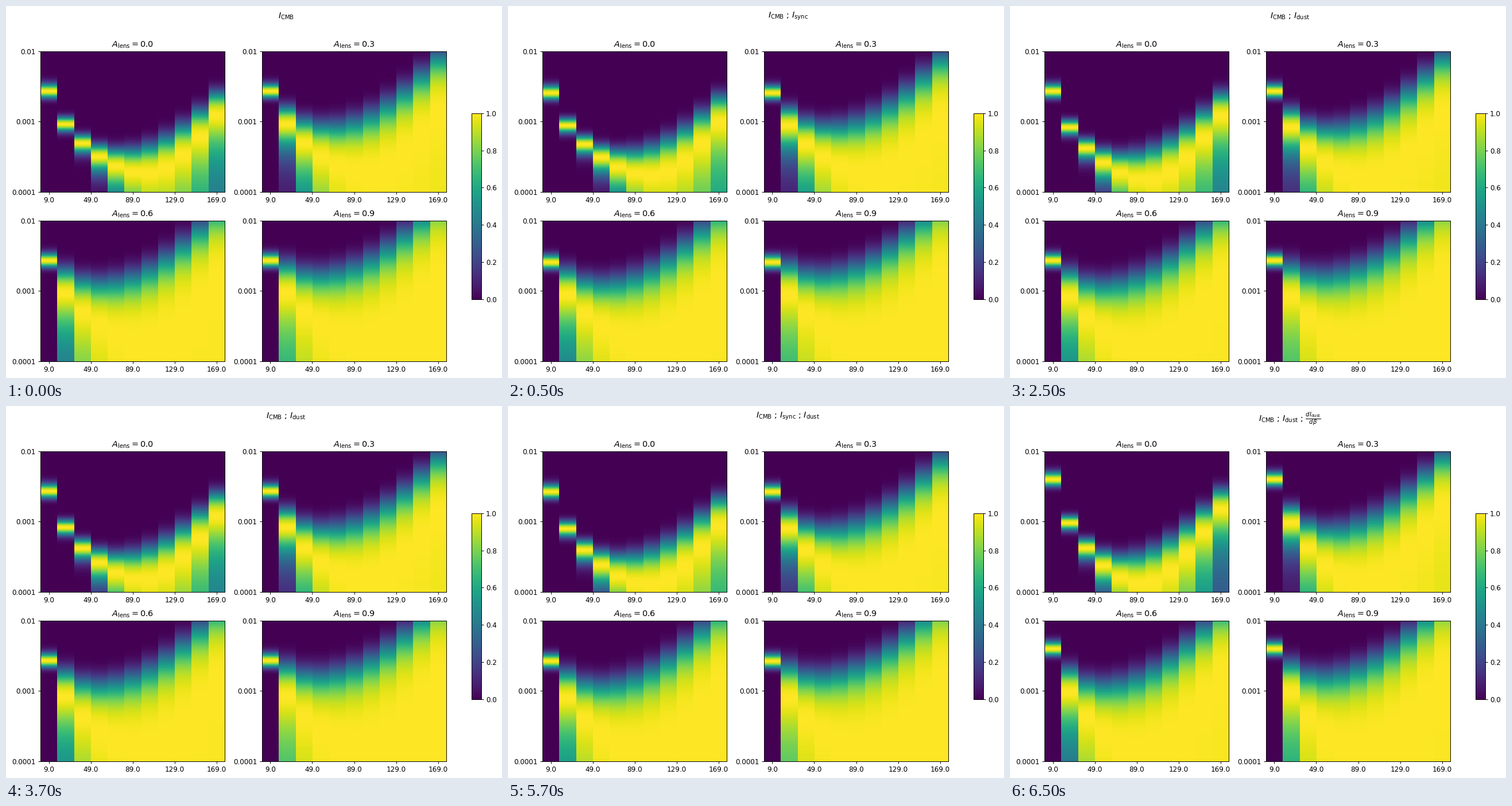
A matplotlib script for the animation above (8000 ms loop, 864x648 px).

```python
import numpy as np
import matplotlib.pyplot as plt
from matplotlib.animation import FuncAnimation

W, H, DPI = 864, 648, 86.4
LENS_AMPS = (0.0, 0.3, 0.6, 0.9)

BIN = np.arange(11)
ELL = 9 + 16 * BIN
MODES = 2.0 * (2 * ELL + 1)

# Spectra are relative to the primordial signal, in units of 1e-6 in r.
# The reionisation bump makes noise and lensing negligible in the first bin.
PAST_BUMP = BIN > 0
NOISE = PAST_BUMP * (400 * np.exp(0.36 * BIN) + 7500 * np.exp(0.9 * (BIN - 10)))
LENSING = PAST_BUMP * (7400 * np.exp(0.19 * BIN)
                       + 315000 * np.exp(0.76 * (BIN - 10)))
R = np.logspace(4, 2, 490)[:, None]

CMB, SYNC, DUST = (rf"$I_\mathrm{{{name}}}$" for name in ("CMB", "sync", "dust"))
DUST_SLOPE = r"$\frac{d I_\mathrm{dust}}{d \beta}$"

# (components, residual in the first bin, its tilt, residual in the last bin)
CASES = [
    ([CMB], 2680, 1.55, 1155),
    ([CMB, SYNC], 2536, 1.53, 890),
    ([CMB, DUST], 2680, 1.70, 1140),
    ([CMB, SYNC, DUST], 2630, 1.74, 820),
    ([CMB, DUST, DUST_SLOPE], 3943, 2.05, 1440),
]


def likelihood(first, tilt, last, lens_amp):
    """Peak-normalised likelihood of r in every multipole bin."""
    peak = first * (1.0 + BIN) ** -tilt + last * np.exp(0.78 * (BIN - 10))
    other = NOISE + lens_amp * LENSING
    q = (peak + other) / (R + other)
    return np.exp(-MODES * (q - 1 - np.log(q)))


def add_axes(left, top, width, height):
    return fig.add_axes([left / W, 1 - (top + height) / H, width / W, height / H])


MAPS = [[likelihood(*residual, amp) for amp in LENS_AMPS] for _, *residual in CASES]

fig = plt.figure(figsize=(W / DPI, H / DPI), dpi=DPI, facecolor="white")
heading = fig.text(487.7 / W, 1 - 9.2 / H, "", size=12, ha="center", va="top")

images = []
ticks = np.arange(9, 170, 40)
for i, amp in enumerate(LENS_AMPS):
    row, col = divmod(i, 2)
    ax = add_axes(59.9 + 385.9 * col, 78.8 + 294.8 * row, 321.4, 245.1)
    images.append(ax.imshow(MAPS[0][i], cmap="viridis", vmin=0, vmax=1,
                            aspect="auto", interpolation="nearest",
                            extent=(1, 177, -4, -2)))
    ax.set_title(rf"$A_\mathrm{{lens}} = {amp}$", size=12)
    ax.set_xticks(ticks, [f"{t:.1f}" for t in ticks])
    ax.set_yticks([-2, -3, -4], ["0.01", "0.001", "0.0001"])

fig.colorbar(images[0], cax=add_axes(811.4, 186.8, 16.2, 324))


def update(n):
    case = (n + 3) // 4
    heading.set_text(" ; ".join(CASES[case][0]))
    for image, data in zip(images, MAPS[case]):
        image.set_data(data)
    return [heading, *images]


anim = FuncAnimation(fig, update, frames=16, interval=500, repeat=True,
                     repeat_delay=0, blit=False)
plt.show()
```
